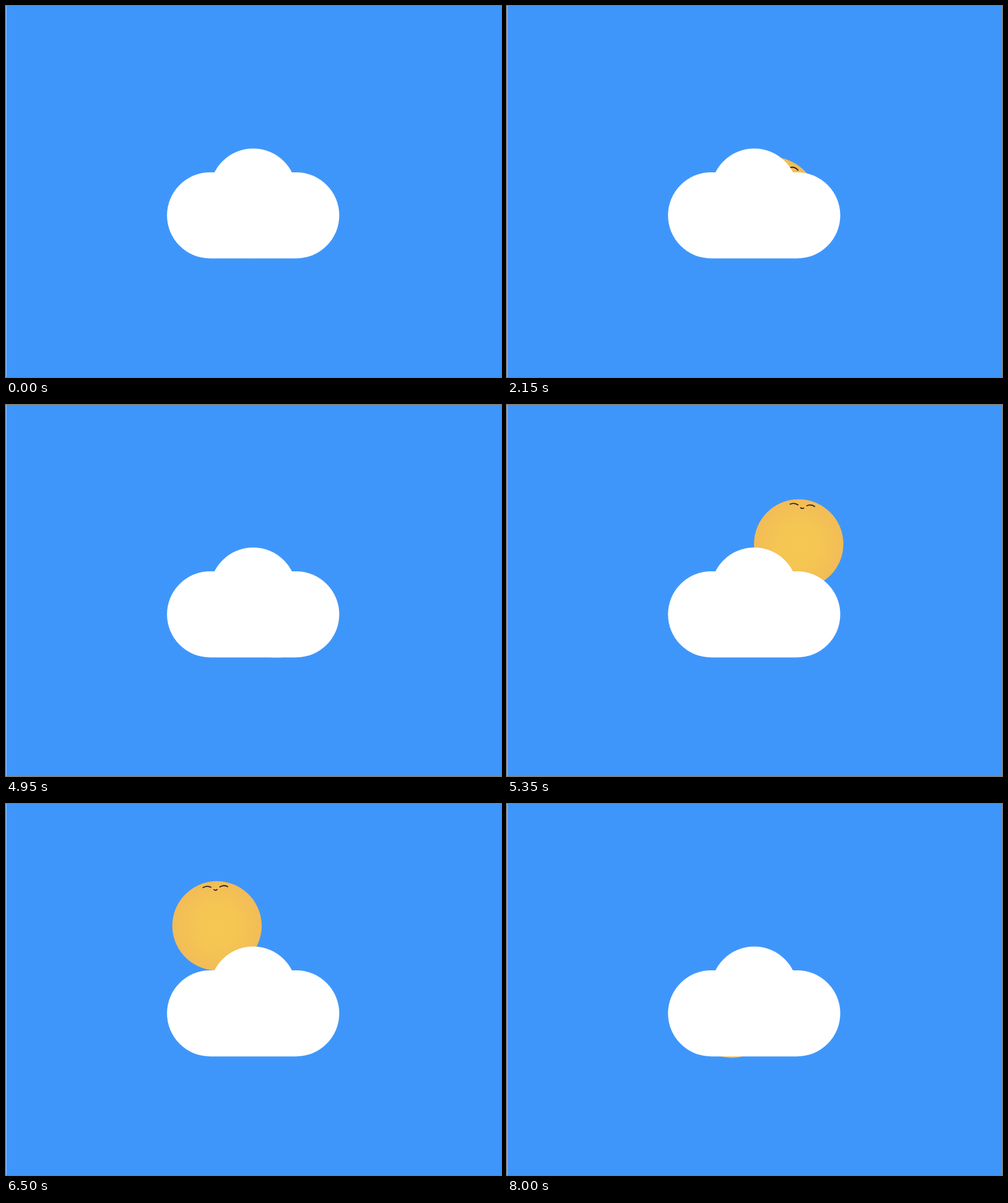
Animation, 800 px wide and 600 px high, one loop 8.05 s. Source, as an HTML page:

```html
<!DOCTYPE html>
<html lang="en">
<head>
<meta charset="utf-8">
<title>Sun and cloud</title>
<style>
  html, body { margin: 0; width: 100%; height: 100%; overflow: hidden; background: #3f96fa; }
  svg { display: block; width: 100%; height: 100%; }
</style>
</head>
<body>
<svg viewBox="0 0 800 600">
  <defs>
    <radialGradient id="glow">
      <stop offset="0" stop-color="#f6c852"/>
      <stop offset="0.5" stop-color="#f5c553"/>
      <stop offset="1" stop-color="#f2bc57"/>
    </radialGradient>
  </defs>
  <rect width="800" height="600" fill="#3f96fa"/>
  <rect width="1" height="600" fill="#8cc0fc"/>
  <g id="sun">
    <circle r="72.2" fill="url(#glow)"/>
    <path d="M-20.5-62.3Q-13.5-66.7-6.5-62.3M6.5-62.3Q13.5-66.7 20.5-62.3M-3-59Q0-56 3-59"
          fill="none" stroke="#2b2722" stroke-width="1.8"/>
  </g>
  <g fill="#fff">
    <rect x="260.2" y="269" width="278.4" height="139.2" rx="69.6"/>
    <circle cx="399.5" cy="300.5" r="70"/>
  </g>
</svg>
<script>
const LOOP = 8050, STEP = 50, LEAP_START = 4650;
const sun = document.getElementById("sun");

// Key points of the leap over the cloud: time, x, y.
const leap = [
  [LEAP_START, 400, 336], [4950, 437, 336.6], [5220, 482, 265],
  [5500, 450, 192], [5750, 421, 183], [6000, 394, 178.5],
  [6500, 341, 197], [6780, 310, 265], [7050, 363, 338.2]
];

const slope = (i, c) => (leap[i + 1][c] - leap[i][c]) / (leap[i + 1][0] - leap[i][0]);

// Harmonic mean of neighbouring slopes keeps the curve from overshooting.
function tangent(i, c) {
  if (i === 0 || i === leap.length - 1) return 0;
  const a = slope(i - 1, c), b = slope(i, c);
  return a * b > 0 ? 2 * a * b / (a + b) : 0;
}

function leapAt(time, c) {
  const t = Math.min(time, leap[leap.length - 1][0]);
  let i = 0;
  while (i < leap.length - 2 && t >= leap[i + 1][0]) i++;
  const span = leap[i + 1][0] - leap[i][0];
  const u = (t - leap[i][0]) / span, v = 1 - u;
  return leap[i][c] * v * v * (1 + 2 * u) + leap[i + 1][c] * u * u * (3 - 2 * u)
    + span * u * v * (v * tangent(i, c) - u * tangent(i + 1, c));
}

function smooth(from, to, t) {
  const u = Math.max(0, Math.min(1, (t - from) / (to - from)));
  return u * u * (3 - 2 * u);
}

function pose(t) {
  if (t < LEAP_START) {
    // Peek out quickly, linger, then slip back behind the cloud.
    const out = (1 - Math.exp(-t / 285)) * (1 - smooth(1900, 2575, t));
    return [400 + 42 * out, 336 - 28 * out, 31 * out];
  }
  const x = leapAt(t, 1);
  return [x, leapAt(t, 2), (x - 380) * 0.06];
}

function draw() {
  const t = Math.floor(performance.now() % LOOP / STEP) * STEP;
  const [x, y, angle] = pose(t);
  sun.setAttribute("transform", `translate(${x} ${y}) rotate(${angle})`);
  requestAnimationFrame(draw);
}
draw();
</script>
</body>
</html>
```
